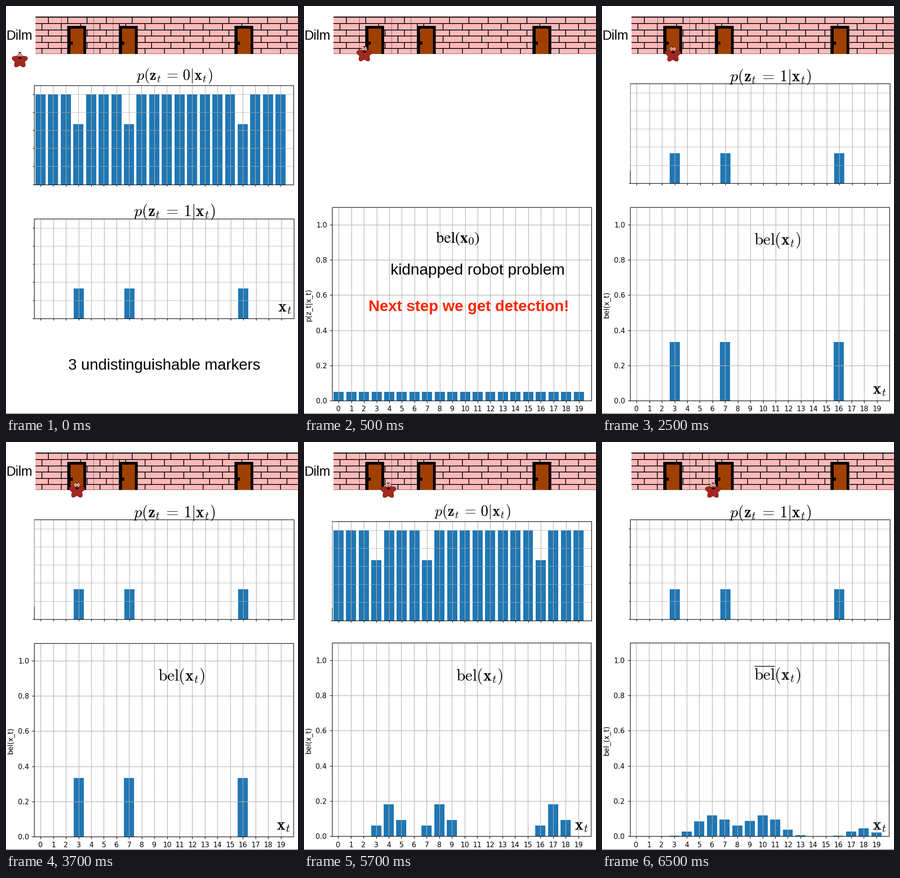
A matplotlib script that plays this animation: 634 by 884 pixels, repeating every 8 s.

```python
import numpy as np
import matplotlib.pyplot as plt
from matplotlib.animation import FuncAnimation
from matplotlib.patches import Ellipse, Polygon, Rectangle

W, H, DPI = 634, 884, 128
PT = 72 / DPI  # points per pixel
STEP = 500
SCENE_STARTS = (0, 500, 2500, 4500, 6500)
CELLS = np.arange(20)
DOORS = (3, 7, 16)

plt.rcParams.update({
    "font.family": "DejaVu Sans",
    "mathtext.fontset": "cm",
    "font.size": 15.2 * PT,
    "axes.linewidth": 1.2 * PT,
    "grid.linewidth": 1.2 * PT,
    "grid.color": "#b0b0b0",
    "xtick.major.width": 1.2 * PT, "ytick.major.width": 1.2 * PT,
    "xtick.major.size": 5 * PT, "ytick.major.size": 5 * PT,
    "xtick.major.pad": 6.5 * PT, "ytick.major.pad": 6 * PT,
})

fig = plt.figure(figsize=(W / DPI, H / DPI), dpi=DPI, facecolor="white")


def layer(zorder):
    ax = fig.add_axes([0, 0, 1, 1], zorder=zorder, label=f"layer{len(fig.axes)}")
    ax.set_xlim(0, W)
    ax.set_ylim(H, 0)
    ax.axis("off")
    return ax


def write(ax, x, baseline, text, size, **kw):
    kw = {"ha": "center", "va": "baseline", **kw}
    return ax.text(x, baseline, text, fontsize=size * PT, **kw)


def sans(ax, x, baseline, text, size, **kw):
    return write(ax, x, baseline, text, size, family="Liberation Sans", **kw)


def rect(ax, left, top, right, bottom, color, zorder=1):
    ax.add_patch(Rectangle((left, top), right - left, bottom - top,
                           fc=color, ec="none", zorder=zorder))


def draw_wall(ax):
    rows = (24, 38, 51.5, 65, 78.5, 92, 103)
    rect(ax, 64, 24, W, 103.5, "#ffb9b9")
    ax.hlines(rows[0], 64, W, color="black", lw=2.2 * PT)
    ax.hlines(rows[1:-1], 64, W, color="black", lw=1.7 * PT)
    ax.hlines(rows[-1], 64, W, color="#333333", lw=0.6 * PT)
    for start, stop in ((64, 246), (246, W)):
        for i, (top, bottom) in enumerate(zip(rows, rows[1:])):
            joints = np.arange(start + 27 - 14 * (i % 2), stop, 42)
            ax.vlines(joints + 0.5, top, bottom, color="black", lw=1.7 * PT)
    ax.vlines((120, 190, 232), 24, 103, color="#222222", lw=0.6 * PT)
    for x in (133, 245, 496):
        rect(ax, x, 43, x + 41, 103.5, "black", 3)
        rect(ax, x + 6.5, 49, x + 34.5, 103.5, "#a04000", 3)
        rect(ax, x + 4, 77, x + 12, 84, "black", 3)


def draw_star(ax, cx, cy):
    a = np.linspace(0, 2 * np.pi, 100)
    r = 14.5 + 3 * np.cos(5 * a)
    points = np.column_stack((cx + r * np.sin(a), cy - r * np.cos(a)))
    ax.add_patch(Polygon(points, fc="#a0281f", ec="#861f18", lw=0.8 * PT, zorder=3))
    for dx in (-3, 3):
        for size, color in (((5, 6.5), "white"), ((2, 2.5), "black")):
            ax.add_patch(Ellipse((cx + dx, cy - 12), *size, fc=color, ec="none", zorder=4))
    smile = np.linspace(-4, 4, 9)
    ax.fill_between(cx + smile, cy - 6.5, cy - 3 - smile**2 / 5, color="black", lw=0, zorder=4)


def chart(box, heights):
    left, top, right, bottom = box
    ax = fig.add_axes([left / W, 1 - bottom / H, (right - left) / W, (bottom - top) / H],
                      zorder=1, label=f"chart{len(fig.axes)}")
    ax.bar(CELLS, heights, 0.8, color="#1f77b4")
    ax.set(xlim=(-0.5, 20), ylim=(0, 1.1), xticks=CELLS, yticks=np.arange(6) / 5)
    ax.grid(True)
    return ax


def sensor_chart(overlay, seen, top=None, worn=False):
    """Likelihood of a detection (seen) or of none; worn hides most of the left axis."""
    at_door = np.isin(CELLS, DOORS)
    if seen:
        box = (61.3, top, 625.2, top + 216)
        heights = np.where(at_door, 1 / 3, 0)
        x, baseline, size = 365, top - 5.5, 34.6
    else:
        box = (61.2, 171.5, 623.7, 386.5)
        heights = np.where(at_door, 2 / 3, 1)
        x, baseline, size = 365.5, 160, 32.2
    ax = chart(box, heights)
    ax.tick_params(labelbottom=False, labelleft=False, length=3.5 * PT)
    ax.grid(True, axis="y", linewidth=0.8 * PT)
    if worn:
        for tick in ax.yaxis.get_major_ticks()[1:]:
            tick.tick1line.set_visible(False)
        ax.spines["left"].set_linewidth(0.6 * PT)
        overlay.vlines(box[0], box[3] - 28, box[3], color="black", lw=1.2 * PT)
    title = rf"$p(\mathbf{{z}}_t\,=\,{int(seen)}|\mathbf{{x}}_t)$"
    write(overlay, x, baseline, title, size)
    return ax


def belief_chart(overlay, heights, ylabel, lift=0):
    overlay.text(11, 647.5 - lift, ylabel, rotation=90, ha="center", va="center")
    return chart((61.5 - lift, 436 - lift, 624 - lift, 855 - lift), heights)


def position_label(ax, x, baseline):
    write(ax, x, baseline, r"$\mathbf{x}_t$", 35)


def belief_label(ax, baseline):
    write(ax, 381, baseline, r"$\mathrm{bel}(\mathbf{x}_t)$", 35.2)


def heights_at(values):
    out = np.zeros(20)
    for cell, value in values.items():
        out[cell] = value
    return out


def intro():
    top = layer(2)
    zero = sensor_chart(top, False)
    one = sensor_chart(top, True, 461)
    position_label(top, 605, 662.5)
    sans(top, 343.5, 788, "3 undistinguishable markers", 33.5)
    draw_star(top, 30, 117.5)
    return top, zero, one


def uniform():
    top = layer(2)
    main = belief_chart(top, np.full(20, 0.05), "p(z_t|x_t)")
    write(top, 333.5, 513, r"$\mathrm{bel}(\mathbf{x}_0)$", 34, math_fontfamily="stix")
    sans(top, 377, 582, "kidnapped robot problem", 34.2)
    sans(top, 357.5, 661, "Next step we get detection!", 33.6, weight="bold", color="#ff2600")
    draw_star(top, 131, 104.5)
    return top, main


def door_seen():
    top = layer(2)
    sensor = sensor_chart(top, True, 168, worn=True)
    main = belief_chart(top, np.isin(CELLS, DOORS) / 3, "bel(x_t)")
    belief_label(top, 517.5)
    position_label(top, 602, 840.5)
    draw_star(top, 154, 105)
    return top, sensor, main


def wall_seen():
    top = layer(2)
    sensor = sensor_chart(top, False, worn=True)
    spread = np.array([1, 3, 1.5]) / 16.5
    belief = heights_at({d + i: v for d in DOORS for i, v in enumerate(spread)})
    main = belief_chart(top, belief, "bel(x_t)", lift=1)
    belief_label(top, 517.5)
    position_label(top, 602, 840.5)
    draw_star(top, 183, 105.5)
    return top, sensor, main


def predicted():
    top = layer(2)
    sensor = sensor_chart(top, True, 168)
    belief = heights_at({3: .003, 4: .026, 5: .083, 6: .119, 7: .094, 8: .061, 9: .086,
                         10: .119, 11: .094, 12: .038, 13: .006, 16: .003, 17: .026,
                         18: .045, 19: .021})
    main = belief_chart(top, belief, "bel_(x_t)", lift=1)
    belief_label(top, 515.5)
    top.hlines(486, 331, 375, color="black", lw=1.5 * PT)
    position_label(top, 602, 840.5)
    draw_star(top, 241, 105.5)
    return top, sensor, main


background = layer(0)
draw_wall(background)
background.hlines(882.5, 0, W, color="#a3a3a3", lw=1.8 * PT)
name = sans(background, 1, 73, "Dilm", 28.6, ha="left")
scenes = [intro(), uniform(), door_seen(), wall_seen(), predicted()]


def update(frame):
    current = np.searchsorted(SCENE_STARTS, frame * STEP, side="right") - 1
    for i, scene in enumerate(scenes):
        for ax in scene:
            ax.set_visible(i == current)
    name.set_visible(current < 4)
    return []


anim = FuncAnimation(fig, update, frames=16, interval=STEP, repeat=True,
                     repeat_delay=0, blit=False)
plt.show()
```
